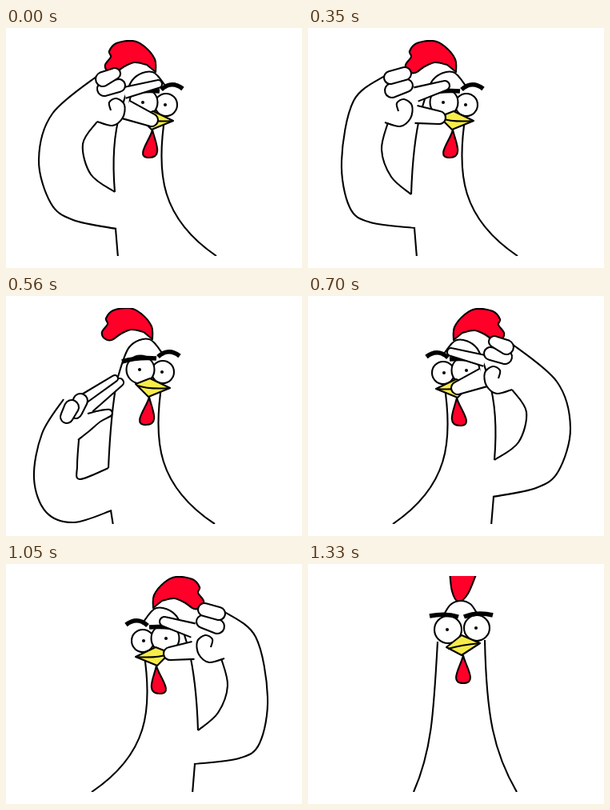
Write an HTML page with a canvas that moves like this. It is 370x300 px and loops after 1.4 s.

```html
<!DOCTYPE html>
<html>
<head>
<meta charset="utf-8">
<style>
html, body { margin: 0; width: 100%; height: 100%; overflow: hidden; background: #fff; }
canvas { display: block; }
</style>
</head>
<body>
<canvas id="stage" width="370" height="300"></canvas>
<script>
const ctx = document.getElementById('stage').getContext('2d');
const STEP = 70, HALF = 10, RED = '#ff0029', YELLOW = '#f8ec4a';

// Three-quarter head; it keeps its shape and only moves.
const sideFace = {
  comb: [183,54, 182,38, 169,22, 154,15, 134,18, 125,28, 127,35, 120,45, 123,53, 132,55, 144,47, 157,42, 172,45],
  skull: [139,104, 154,64, 179,54, 197,74],
  eyes: [[196,95,14], [168,92,17.5]],
  brows: [[145,82, 165,76, 188,78], [190,76, 203,64, 217,75]],
  beak: [162,110, 180,103, 205,115, 178,126],
  wattle: [179,126, -4]
};
const frontFace = {
  comb: [177,8, 180,34, 188,47, 200,37, 212,8],
  skull: [170,63, 178,51, 190,46, 203,50, 212,63],
  eyes: [[211,80,16], [175,82,17]],
  brows: [[152,65, 172,61, 188,66], [195,66, 212,59, 231,64]],
  beak: [173,104, 192,89, 215,99, 192,114],
  wattle: [194,114, 0]
};

// Thumb curled in around a centre.
const curl = (x, y) => [-6,-2, -8,-12, 1,-17, 11,-9, 9,7, -4,17, -23,12].map((v, i) => v + (i % 2 ? y : x));

// Salute poses. Fingers: base x, y, radius, then tip x, y, radius.
const salute = [
  { at: [0], head: [4,1],
    arm: [118,57, 58,107, 41,165, 56,219, 84,240, 138,251],
    armpit: [114,117, 96,145, 106,183, 136,205],
    low: [150,102,12, 182,115,8], high: [148,81,7, 190,70,5],
    ring: [123,76,9, 141,72,8], pinky: [121,64,9, 136,57,7], thumb: curl(137,105) },
  { at: [2], head: [3,7],
    arm: [106,57, 52,99, 33,158, 49,215, 80,240, 134,253],
    armpit: [107,118, 89,148, 100,187, 130,205],
    low: [140,106,10, 174,114,8], high: [138,83,9, 183,71,5],
    ring: [116,76,9, 135,71,8], pinky: [113,61,8, 129,56,7], thumb: curl(130,106) },
  { at: [5], head: [2,1],
    arm: [97,59, 57,91, 42,166, 52,224, 78,243, 134,250],
    armpit: [100,118, 92,152, 104,186, 129,208],
    low: [135,108,11, 164,112,8], high: [135,83,9, 171,72,6],
    ring: [105,78,9, 123,72,8], pinky: [103,62,8, 121,57,8], thumb: curl(119,106) },
  { at: [8], head: [0,0],
    arm: [72,129, 45,172, 35,228, 50,270, 85,283, 132,268],
    armpit: [91,180, 89,212, 92,229, 128,215],
    low: [103,137,9, 142,108,5], high: [98,128,6, 136,103,4],
    ring: [87,145,8, 93,131,9], pinky: [76,151,8, 82,139,9],
    thumb: [102,147, 118,143, 130,142, 132,149, 118,157, 105,168, 90,180] }
];

function poseAt(step) {
  const i = Math.max(1, salute.findIndex(p => p.at[0] >= step));
  const a = salute[i - 1], b = salute[i];
  const k = (step - a.at[0]) / (b.at[0] - a.at[0]);
  const pose = {};
  for (const part in a) pose[part] = a[part].map((v, j) => v + (b[part][j] - v) * k);
  return pose;
}

function ink(fill, width = 2.1) {
  if (fill) { ctx.fillStyle = fill; ctx.fill(); }
  ctx.lineWidth = width;
  ctx.stroke();
}

// Smooth curve through the points.
function spline(pts, fill, closed) {
  const n = pts.length / 2;
  const at = i => {
    i = Math.min(n - 1, Math.max(0, i));
    return [pts[2 * i], pts[2 * i + 1]];
  };
  ctx.beginPath();
  ctx.moveTo(...at(0));
  for (let i = 0; i < n - 1; i++) {
    const [p, q, r, s] = [at(i - 1), at(i), at(i + 1), at(i + 2)];
    ctx.bezierCurveTo(q[0] + (r[0] - p[0]) / 6, q[1] + (r[1] - p[1]) / 6,
      r[0] - (s[0] - q[0]) / 6, r[1] - (s[1] - q[1]) / 6, r[0], r[1]);
  }
  if (closed) ctx.closePath();
  ink(fill);
}

// One straight, quadratic or cubic stroke.
function stroke([x, y, ...rest], width) {
  ctx.beginPath();
  ctx.moveTo(x, y);
  ctx[{ 2: 'lineTo', 4: 'quadraticCurveTo', 6: 'bezierCurveTo' }[rest.length]](...rest);
  ink(null, width);
}

// Tapered capsule, with or without a rounded base.
function finger([bx, by, br, tx, ty, tr], rounded) {
  const dir = Math.atan2(ty - by, tx - bx), side = Math.PI / 2;
  ctx.beginPath();
  if (rounded) ctx.arc(bx, by, br, dir + side, dir - side);
  else ctx.moveTo(bx + br * Math.sin(dir), by - br * Math.cos(dir));
  ctx.arc(tx, ty, tr, dir - side, dir + side);
  if (rounded) ctx.closePath();
  else ctx.lineTo(bx - br * Math.sin(dir), by + br * Math.cos(dir));
  ink('#fff');
}

function disc(x, y, r, fill) {
  ctx.beginPath();
  ctx.arc(x, y, r, 0, 7);
  ink(fill);
}

function drawFace({ comb, skull, eyes, brows, beak, wattle }) {
  spline(comb, RED, true);
  spline(skull, '#fff');

  const [x, y, lean] = wattle, cx = x + lean, bottom = y + 35;
  ctx.beginPath();
  ctx.moveTo(x, y);
  ctx.bezierCurveTo(x - 2, y + 12, cx - 19, bottom, cx, bottom);
  ctx.bezierCurveTo(cx + 19, bottom, x + 2, y + 12, x, y);
  ink(RED);

  for (const [ex, ey, r] of eyes) {
    disc(ex, ey, r, '#fff');
    disc(ex - 1, ey, 1, '#000');
  }
  for (const brow of brows) stroke(brow, 5.5);

  const [lx, ly, topX, topY, rx, ry, lowX, lowY] = beak;
  ctx.beginPath();
  ctx.moveTo(lx, ly);
  ctx.lineTo(topX, topY);
  ctx.lineTo(rx, ry);
  ctx.lineTo(lowX, lowY);
  ctx.closePath();
  ink(YELLOW);
  stroke([lx + 2, ly + 2, topX, ry + 2, rx, ry]);
}

function drawSalute({ head: [dx, dy], arm, armpit, low, high, ring, pinky, thumb }) {
  stroke([139 + dx, 104 + dy, 131, 145, ...armpit.slice(-2)]);
  stroke([195 + dx, 108, 183 + dx, 183, 190 + dx, 238, 261 + dx / 2, 285]);
  ctx.save();
  ctx.translate(dx, dy);
  drawFace(sideFace);
  ctx.restore();

  const [x, y] = arm.slice(-2);
  stroke([x - 1, y, x + 2, 287]);
  spline(arm);
  spline(armpit);
  finger(low);
  finger(high);
  finger(ring, true);
  finger(pinky, true);
  spline(thumb, '#fff');
}

function drawFront() {
  stroke([162, 97, 157, 190, 154, 235, 132, 285]);
  stroke([221, 95, 223, 190, 232, 235, 261, 285]);
  drawFace(frontFace);
}

function draw() {
  const step = Math.floor(performance.now() / STEP) % (2 * HALF);
  const beat = step % HALF, last = HALF - 1;
  ctx.fillStyle = '#fff';
  ctx.fillRect(0, 0, 370, 300);
  ctx.save();
  ctx.beginPath();
  ctx.rect(0, 15, 370, 270);
  ctx.clip();
  // Each front view already faces the side of the next salute.
  if (step >= last && step < last + HALF) ctx.transform(-1, 0, 0, 1, 369, 0);
  ctx.lineJoin = 'round';
  if (beat === last) drawFront();
  else drawSalute(poseAt(beat));
  ctx.restore();
  requestAnimationFrame(draw);
}
draw();
</script>
</body>
</html>
```
